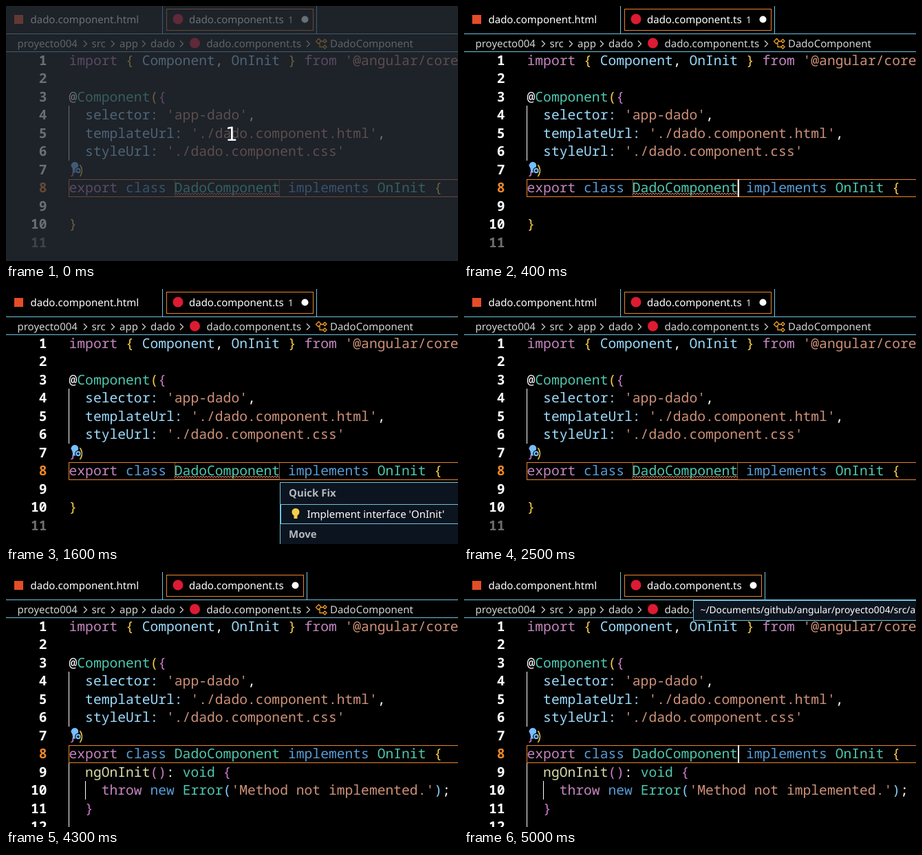
Recreate the animation shown at these times as an HTML page. Size 657x371 px, loop 5200 ms.

```html
<!DOCTYPE html>
<html lang="es">
<head>
<meta charset="utf-8">
<title>Quick fix in a code editor</title>
<style>
html, body { margin: 0; width: 100%; height: 100%; overflow: hidden; background: #000; }
svg { display: block; width: 657px; height: 371px; }
text { white-space: pre; text-rendering: geometricPrecision; }
.ui { font: 15px "Noto Sans", "Open Sans", sans-serif; fill: #fff; }
.crumb { fill: #d4d4d4; }
.code { font: 500 19.67px "Noto Sans Mono", "DejaVu Sans Mono", monospace; fill: #fff; }
.num { text-anchor: end; font-weight: 600; }
.k { fill: #c586c0; } .v { fill: #9cdcfe; } .s { fill: #ce9178; }
.t { fill: #4ec9b0; } .b { fill: #569cd6; } .f { fill: #dcdcaa; }
.y { fill: #f5cd48; } .o { fill: #cf7acb; } .l { fill: #87cefa; }
.w { fill: #fff; }
.cyan { fill: none; stroke: #6fc3df; }
.orange { fill: none; stroke: #e8852b; }
.guide { fill: none; stroke: #fff; }

.anim { animation: 5200ms step-end infinite; }
#veil { animation-name: veil; }
#caret { animation-name: caret; }
#menu { animation-name: menu; }
#before { animation-name: before; }
#after { animation-name: after; }
#error { animation-name: error; }
#fixed { animation-name: fixed; }
#file { animation-name: hover; }
#tip { animation-name: tip; }

@keyframes veil { 0% { opacity: 1 } 1.92%, 100% { opacity: 0 } }
@keyframes caret {
  0% { opacity: 0 } 5.76% { opacity: .5 } 7.69% { opacity: 1 }
  21.15% { opacity: .5 } 23.07% { opacity: 0 }
  50% { opacity: .5 } 51.92% { opacity: 1 }
  61.53% { opacity: .5 } 63.46% { opacity: 0 }
  73.07% { opacity: .5 } 75% { opacity: 1 }
  80.76% { opacity: .5 } 82.69% { opacity: 0 }
  90.38% { opacity: .5 } 92.3%, 100% { opacity: 1 }
}
@keyframes menu { 0% { opacity: 0 } 28.84% { opacity: 1 } 48.07%, 100% { opacity: 0 } }
@keyframes before { 0% { opacity: 1 } 50%, 100% { opacity: 0 } }
@keyframes after { 0% { opacity: 0 } 50%, 100% { opacity: 1 } }
@keyframes error { 0% { opacity: 1 } 51.92%, 100% { opacity: 0 } }
@keyframes fixed { 0% { opacity: 0 } 51.92%, 100% { opacity: 1 } }
@keyframes hover { 0% { fill: #d4d4d4 } 78.84%, 100% { fill: #e2e2e2 } }
@keyframes tip {
  0% { opacity: 0 } 90.38% { opacity: .25 } 92.3% { opacity: .55 }
  94.23% { opacity: .85 } 96.15%, 100% { opacity: 1 }
}
</style>
</head>
<body>
<svg viewBox="0 0 657 371">
  <rect width="657" height="371"/>

  <!-- tabs -->
  <path class="cyan" d="M0 40.5H657M0 66.5H657M227.5 0V40"/>
  <rect x="12" y="13" width="13" height="13" fill="#e44d26"/>
  <text class="ui" x="35.5" y="25">dado.component.html</text>
  <circle cx="250" cy="19" r="7.5" fill="#dd1b32"/>
  <text class="ui" x="266" y="25">dado.component.ts</text>
  <g id="error" class="anim">
    <path class="cyan" d="M451.5 0V40"/>
    <rect class="orange" x="233.5" y="4.5" width="213" height="31"/>
    <text class="ui" x="410" y="25" style="font-size:13.5px" fill-opacity=".9">1</text>
    <circle cx="434.5" cy="19.5" r="5" fill="#fff"/>
    <rect x="245.5" y="252.5" width="152" height="24" fill="none" stroke="#e8a070" stroke-dasharray="1 1"/>
    <path id="wave" fill="none" stroke="#e88a78"/>
  </g>
  <g id="fixed" class="anim">
    <path class="cyan" d="M437.5 0V40"/>
    <rect class="orange" x="233.5" y="4.5" width="199" height="31"/>
    <circle cx="420.5" cy="19.5" r="5" fill="#fff"/>
  </g>

  <!-- breadcrumbs -->
  <g class="ui crumb">
    <text x="16.5" y="60">proyecto004</text>
    <text x="124.5" y="60">src</text>
    <text x="165" y="60">app</text>
    <text x="210" y="60">dado</text>
    <text id="file" class="anim" x="291.5" y="60">dado.component.ts</text>
    <text x="471" y="60">DadoComponent</text>
  </g>
  <path id="chevrons" fill="none" stroke="#d4d4d4" stroke-width="1.2"/>
  <circle cx="274.5" cy="54" r="7.5" fill="#dd1b32"/>
  <path fill="none" stroke="#ee9d28" stroke-width="1.3"
    d="M450.5 51.5L454.5 47.5L458 51L454 55ZM457 51.5H461M456 54V59.5H461M461 51L463.5 48.5L466 51L463.5 53.5ZM461 59.5L463.5 57L466 59.5L463.5 62Z"/>

  <!-- editor -->
  <path class="guide" d="M91.5 145V225"/>
  <rect class="orange" x="91.5" y="252.5" width="580" height="25"/>
  <g id="base" class="code"></g>
  <g id="before" class="code anim"></g>
  <g id="after" class="code anim">
    <path class="guide" d="M91.5 278V371M115.5 304V331"/>
  </g>
  <g fill="#75beff">
    <circle cx="100" cy="232" r="5.2"/>
    <path d="M97 235H103V242.5H97Z"/>
    <circle cx="105" cy="239.5" r="4.8" fill="#000"/>
    <circle cx="105" cy="239.5" r="2.7" fill="none" stroke="#75beff" stroke-width="2"/>
  </g>
  <rect id="caret" class="anim" x="398" y="252" width="2" height="26" fill="#fff"/>

  <g id="menu" class="anim">
    <rect class="cyan" x="398.5" y="281.5" width="280" height="110" style="fill:#0c141f"/>
    <rect class="cyan" x="399.5" y="313.5" width="280" height="28"/>
    <g class="ui">
      <text x="411" y="302" font-weight="700" fill="#b4b8be">Quick Fix</text>
      <text x="437.5" y="333">Implement interface 'OnInit'</text>
      <text x="411" y="362" font-weight="700" fill="#b4b8be">Move</text>
    </g>
    <g fill="#f5cd48">
      <circle cx="421" cy="324.5" r="5.5"/>
      <path d="M418.5 328H423.5V334H418.5Z"/>
    </g>
  </g>

  <g id="tip" class="anim">
    <rect class="cyan" x="333.5" y="41.5" width="340" height="29" style="fill:#0c141f"/>
    <text class="ui" x="343.5" y="60" style="font-size:13.8px">~/Documents/github/angular/proyecto004/src/app</text>
  </g>

  <g id="veil" class="anim">
    <rect width="657" height="371" fill="#2c313b" fill-opacity=".7"/>
    <text x="328" y="196" text-anchor="middle" fill="#fff" style="font:28px 'DejaVu Sans',sans-serif">1</text>
  </g>
</svg>
<script>
const NS = 'http://www.w3.org/2000/svg';
const ADVANCE = 11.8;
const $ = id => document.getElementById(id);
const baseline = n => 86 + 26.45 * (n - 1);

function add(parent, tag, attrs, content = '') {
  const el = document.createElementNS(NS, tag);
  for (const name in attrs) el.setAttribute(name, attrs[name]);
  el.textContent = content;
  return parent.appendChild(el);
}

// Tokens alternate between a colour class and its text.
function row(layer, n, indent, ...tokens) {
  const line = add($(layer), 'text', { x: 91.5 + indent * ADVANCE, y: baseline(n) });
  for (let i = 0; i < tokens.length; i += 2)
    add(line, 'tspan', { class: tokens[i] }, tokens[i + 1]);
}

function number(layer, n, color = '#fff') {
  add($(layer), 'text', { class: 'num', x: 59.5, y: baseline(n), style: `fill:${color}` }, n);
}

for (let n = 1; n <= 10; n++) number('base', n, n === 8 ? '#e8852b' : '#fff');
number('before', 11, '#6e6e6e');
number('after', 11);
number('after', 12);

row('base', 1, 0, 'k', 'import ', 'y', '{ ', 'v', 'Component', 'w', ', ', 'v', 'OnInit ',
  'y', '} ', 'k', 'from ', 's', "'@angular/core'");
row('base', 3, 0, 'w', '@', 't', 'Component', 'y', '(', 'o', '{');
row('base', 4, 2, 'v', 'selector: ', 's', "'app-dado'", 'w', ',');
row('base', 5, 2, 'v', 'templateUrl: ', 's', "'./dado.component.html'", 'w', ',');
row('base', 6, 2, 'v', 'styleUrl: ', 's', "'./dado.component.css'");
row('base', 7, 0, 'o', '}', 'y', ')');
row('base', 8, 0, 'k', 'export ', 'b', 'class ', 't', 'DadoComponent ', 'b', 'implements ',
  't', 'OnInit ', 'y', '{');
row('before', 10, 0, 'y', '}');
row('after', 9, 2, 'f', 'ngOnInit', 'o', '()', 'w', ': ', 't', 'void ', 'o', '{');
row('after', 10, 4, 'k', 'throw ', 'b', 'new ', 't', 'Error', 'l', '(',
  's', "'Method not implemented.'", 'l', ')', 'w', ';');
row('after', 11, 2, 'o', '}');

$('chevrons').setAttribute('d',
  [113, 153, 198, 253, 437].map(x => `M${x} 50.5l4.5 4.5l-4.5 4.5`).join(''));
$('wave').setAttribute('d', 'M245 274.5' + 'l2 -2.5l2 2.5'.repeat(38));
</script>
</body>
</html>
```
